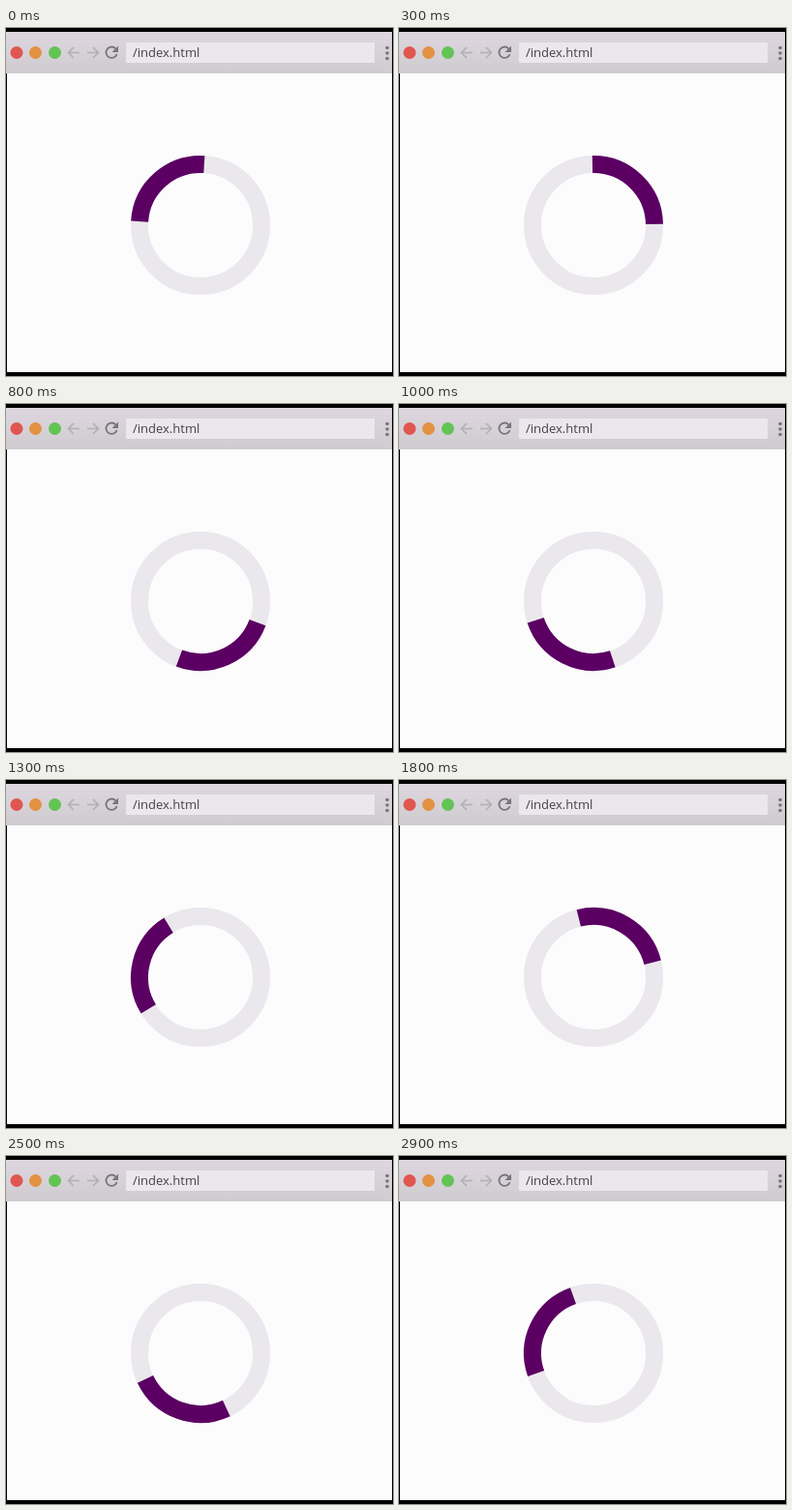
Write an HTML page that moves like this. It is 400 px wide and 360 px high and loops after 3 s.

```html
<!DOCTYPE html>
<html lang="en">
<head>
<meta charset="utf-8">
<title>Loading spinner</title>
<style>
  html, body { margin: 0; height: 100%; overflow: hidden; background: #000; }
  svg { display: block; width: 400px; height: 360px; }
  text { font: 500 13px "Open Sans", "Noto Sans", sans-serif; fill: #434046; }
</style>
</head>
<body>
<svg viewBox="0 0 400 360">
  <defs>
    <linearGradient id="bar" x2="0" y2="1">
      <stop offset="0" stop-color="#ded6df"/>
      <stop offset="1" stop-color="#cfcbd0"/>
    </linearGradient>
  </defs>
  <rect y="4" width="399" height="43" fill="url(#bar)"/>
  <rect x="1" y="47" width="398" height="309" fill="#fcfcfc"/>

  <circle cx="11" cy="25.5" r="6.5" fill="#e0574f"/>
  <circle cx="30.5" cy="25.5" r="6.5" fill="#e39143"/>
  <circle cx="50.5" cy="25.5" r="6.5" fill="#62c454"/>
  <g fill="none" stroke="#b3afb5" stroke-width="1.6">
    <path d="M76 25.5H65M70 20l-5.5 5.5 5.5 5.5M84 25.5h11M90 20l5.5 5.5-5.5 5.5"/>
    <path d="M113.5 21.5A5.7 5.7 0 1 0 114.6 27" stroke="#79757c" stroke-width="1.8"/>
  </g>
  <path d="M116 18.5v6.5h-6.5z" fill="#79757c"/>
  <rect x="124" y="15" width="257" height="21" fill="#ebe8ed"/>
  <text x="131" y="30">/index.html</text>
  <g fill="#777379">
    <circle cx="394" cy="20.5" r="1.8"/>
    <circle cx="394" cy="26" r="1.8"/>
    <circle cx="394" cy="31.5" r="1.8"/>
  </g>

  <g fill="none" stroke-width="18">
    <circle cx="201" cy="204" r="63" stroke="#ebe8ed"/>
    <circle id="arc" cx="201" cy="204" r="63" stroke="#5b0062" pathLength="4" stroke-dasharray="1 3"/>
  </g>
</svg>
<script>
  const LOOP = 3000, STEP = 100;
  // [time in ms, degrees clockwise from the top to the middle of the arc]
  const keys = [[0, -41.5], [300, 44], [800, 155.5], [1300, 283.5],
                [1800, 391], [2200, 488], [2900, 655.5], [LOOP, 678.5]];
  const arc = document.getElementById("arc");

  function angleAt(time) {
    const next = keys.findIndex(([t]) => t > time);
    const [t0, a0] = keys[next - 1], [t1, a1] = keys[next];
    return a0 + (a1 - a0) * (time - t0) / (t1 - t0);
  }

  const start = performance.now();
  function draw() {
    const elapsed = (performance.now() - start) % LOOP;
    const time = Math.floor(elapsed / STEP) * STEP;
    arc.setAttribute("transform", `rotate(${angleAt(time) - 135} 201 204)`);
    requestAnimationFrame(draw);
  }
  draw();
</script>
</body>
</html>
```
